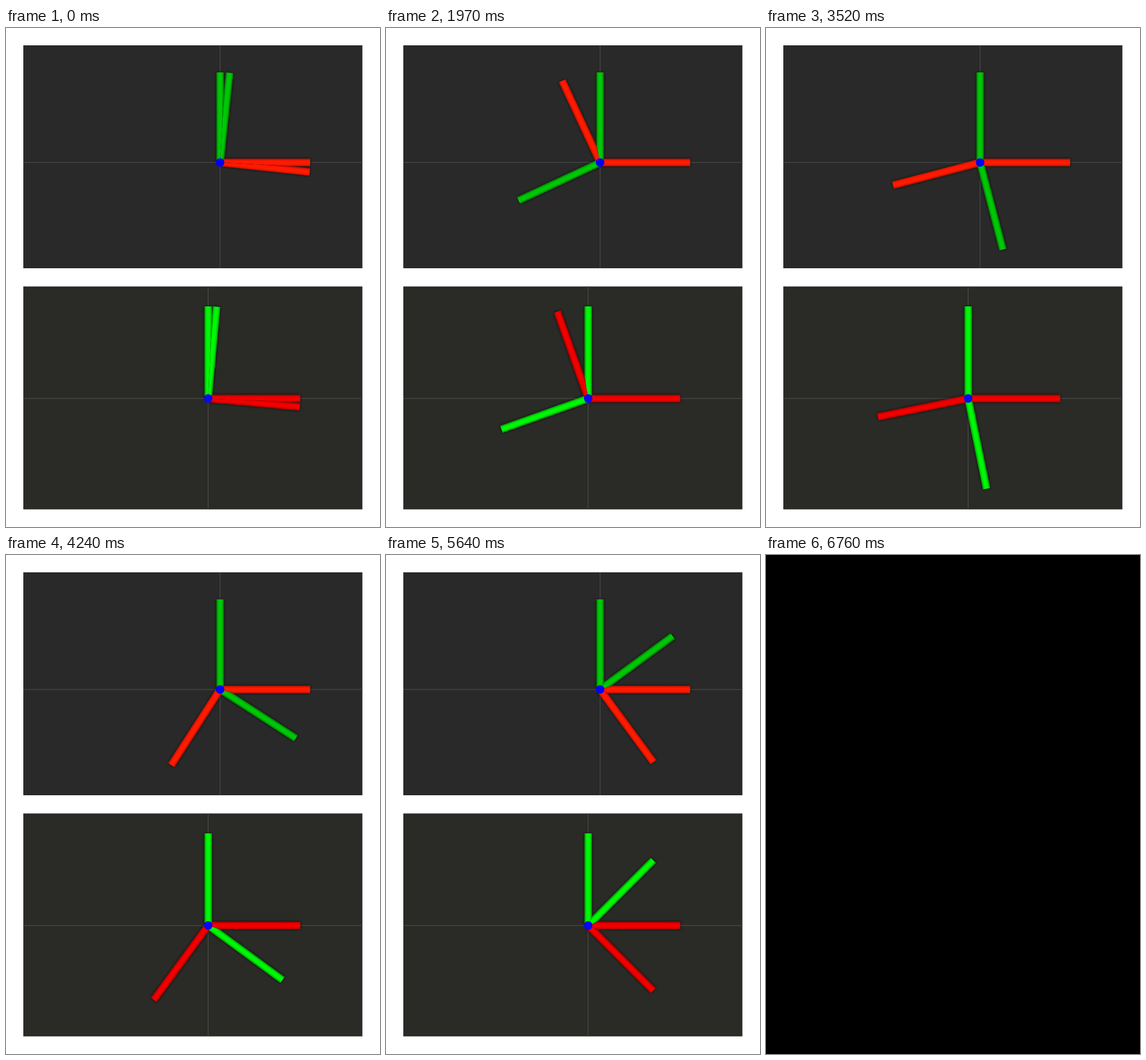
Write an HTML page with a canvas that moves like this. It is 648 px wide and 864 px high and loops after 6.79 s.

```html
<!DOCTYPE html>
<html lang="en">
<head>
<meta charset="utf-8">
<title>Rotating axes</title>
<style>
html, body { margin: 0; width: 100%; height: 100%; overflow: hidden; background: #fff; }
canvas { display: block; }
</style>
</head>
<body>
<canvas id="stage" width="648" height="864"></canvas>
<script>
const ctx = document.getElementById('stage').getContext('2d');
const LOOP = 6790, FADE_START = 5790, FADE_END = 6760;
const TAU = Math.PI * 2;
const times = [0, 850, 1970, 3520, 4910, 6120, 6790];

// Angles are in degrees, counter-clockwise from the right.
const views = [
  {
    y: 30, h: 386, cx: 371, cy: 232.8, len: 156, bg: '#292929',
    red: ['#b01000', '#ff1a00', '#c41200'],
    green: ['#007a00', '#00c808', '#007a00'],
    blue: '#0000fa',
    angles: [-6.1, 21.4, 114.9, 194.6, 274.6, 325.5, 352]
  },
  {
    y: 447.5, h: 386, cx: 350.3, cy: 641.5, len: 159.5, bg: '#2a2a26',
    red: ['#a00000', '#f20000', '#a80000'],
    green: ['#009000', '#00f808', '#009c00'],
    blue: '#0808f2',
    angles: [-5.3, 45.8, 109.5, 191.5, 273.6, 341.6, 378]
  }
];

// Smooth curve through the key angles that never turns back.
function angleAt(keys, t) {
  const rate = i => (keys[i + 1] - keys[i]) / (times[i + 1] - times[i]);
  const slope = i => {
    if (i === 0) return rate(0);
    if (i === keys.length - 1) return rate(i - 1);
    const a = rate(i - 1), b = rate(i);
    return 2 * a * b / (a + b);
  };
  let i = 0;
  while (i < times.length - 2 && t >= times[i + 1]) i++;
  const d = times[i + 1] - times[i], u = (t - times[i]) / d;
  const v = 1 - u;
  return keys[i] * v * v * (1 + 2 * u) + keys[i + 1] * u * u * (3 - 2 * u)
    + d * u * v * (slope(i) * v - slope(i + 1) * u);
}

const wrap = a => ((a % 360) + 360) % 360;

// Equal rods crossing at one depth meet along the line halfway between them.
function drawRod(view, rod, before, after) {
  const rad = Math.PI / 180;
  ctx.save();
  ctx.translate(view.cx, view.cy);
  ctx.rotate(-rod.angle * rad);
  ctx.beginPath();
  ctx.moveTo(0, 0);
  ctx.arc(0, 0, 300, -Math.min(after / 2, 90) * rad, Math.min(before / 2, 90) * rad);
  ctx.closePath();
  ctx.clip();
  const shade = ctx.createLinearGradient(0, -6.5, 0, 6.5);
  const [top, mid, low] = rod.colors;
  shade.addColorStop(0, top);
  shade.addColorStop(0.3, mid);
  shade.addColorStop(0.7, mid);
  shade.addColorStop(1, low);
  ctx.shadowColor = 'rgba(0,0,0,0.65)';
  ctx.shadowBlur = 5;
  ctx.fillStyle = shade;
  ctx.fillRect(0, -6.5, view.len, 13);
  ctx.restore();
}

function drawView(view, t) {
  const { y, h, cx, cy } = view;
  ctx.fillStyle = view.bg;
  ctx.fillRect(30, y, 587.5, h);
  ctx.fillStyle = '#464646';
  ctx.fillRect(30, cy - 0.7, 587.5, 1.4);
  ctx.fillRect(cx - 0.7, y, 1.4, h);

  const turn = angleAt(view.angles, t);
  const rods = [
    { angle: 0, colors: view.red },
    { angle: 90, colors: view.green },
    { angle: wrap(turn), colors: view.red },
    { angle: wrap(turn + 90), colors: view.green }
  ].sort((a, b) => a.angle - b.angle);
  rods.forEach((rod, i) => {
    const prev = rods[(i + 3) % 4], next = rods[(i + 1) % 4];
    drawRod(view, rod, wrap(rod.angle - prev.angle), wrap(next.angle - rod.angle));
  });

  ctx.fillStyle = view.blue;
  ctx.beginPath();
  ctx.arc(cx, cy, 7.4, 0, TAU);
  ctx.fill();
}

function draw(t) {
  ctx.fillStyle = '#fff';
  ctx.fillRect(0, 0, 648, 864);
  views.forEach(view => drawView(view, t));
  const dark = Math.min(1, Math.max(0, (t - FADE_START) / (FADE_END - FADE_START)));
  if (dark > 0) {
    ctx.fillStyle = `rgba(0,0,0,${dark})`;
    ctx.fillRect(0, 0, 648, 864);
  }
}

const start = performance.now();
function tick() {
  draw((performance.now() - start) % LOOP);
  requestAnimationFrame(tick);
}
tick();
</script>
</body>
</html>
```
